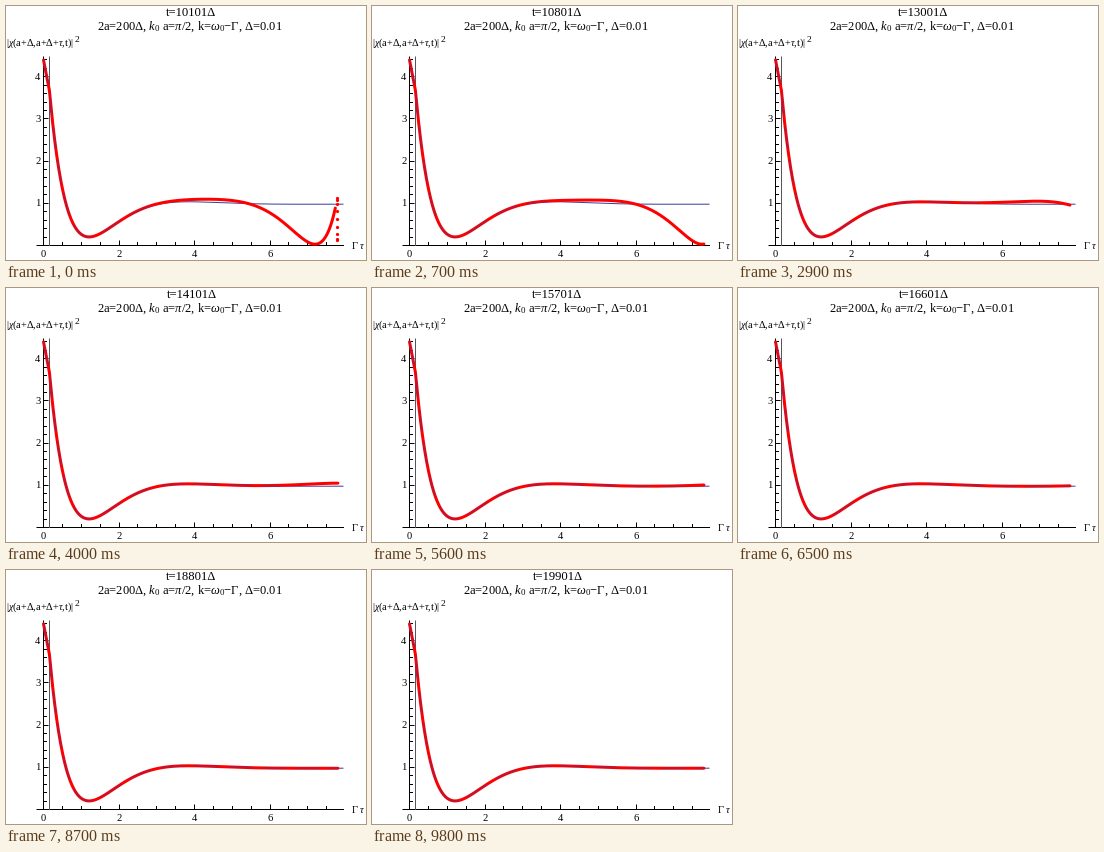
Recreate the animation shown at these times as a matplotlib script. Size 360x254 px, loop 9.9 s.

```python
import numpy as np
import matplotlib as mpl
import matplotlib.pyplot as plt
from matplotlib.animation import FuncAnimation

W, H, DPI = 360, 254, 100
FRAMES, INTERVAL = 99, 100
GAMMA = np.pi / 40
STEP = 0.01 * GAMMA          # one time step, in units of 1/Gamma
DELAY = 2 * GAMMA            # travel time between the two mirrors' ends
X0, Y0, SX, SY = 37.5, 239.5, 37.75, 42.2
RED, BLUE = "#ff0000", "#3f3d99"

mpl.rcParams.update({
    "font.family": "Liberation Serif",
    "mathtext.fontset": "custom",
    "mathtext.rm": "Liberation Serif",
    "mathtext.it": "Liberation Serif:italic",
})


def pt(px):
    return px * 72 / DPI


def to_px(x, y):
    return X0 + SX * np.asarray(x), Y0 - SY * np.asarray(y)


def interference(x, size, decay, freq, phase):
    """Intensity of a unit wave minus a decaying, rotating one."""
    m = size * np.exp(-decay * x)
    return 1 - 2 * m * np.sin(freq * x + phase) + m ** 2


def steady(x):
    def late(v):
        return 0.98 * interference(v, 2.18, 1.03, 1, 0.03)
    early = 4.4 + (late(DELAY) - 4.4) * x / DELAY
    return np.where(x < DELAY, early, late(x))


def build_up(s):
    """Relative size a time s after the wave front has passed."""
    return interference(s, 1.93, 1.07, 0.93, 0.75)


fig = plt.figure(figsize=(W / DPI, H / DPI), dpi=DPI, facecolor="white")
ax = fig.add_axes([0, 0, 1, 1])
ax.set_xlim(0, W)
ax.set_ylim(H, 0)
ax.axis("off")


def label(x, y, text, size, ha="center"):
    return ax.text(x, y, text, fontsize=pt(size), ha=ha, va="baseline")


def stroke(xs, ys, color="black", width=1, **kw):
    return ax.plot(xs, ys, color=color, lw=pt(width), snap=False, **kw)[0]


def centre(v):
    return np.floor(v) + 0.5


def tick_length(k, every):
    return 4.5 if k % every == 0 else 3


# axes and ticks
stroke([31, 337.5], [Y0, Y0], zorder=1)
stroke([X0, X0], [51, Y0], zorder=1)
for k in range(16):
    x = centre(X0 + SX * k / 2)
    stroke([x, x], [Y0, Y0 - tick_length(k, 4)], zorder=1)
for k in range(1, 23):
    y = centre(Y0 - SY * k / 5)
    stroke([X0, X0 + tick_length(k, 5)], [y, y], zorder=1)
for n in range(0, 8, 2):
    label(X0 + n * SX, 251, str(n), 10.5)
for n in range(1, 5):
    label(34.5, Y0 - n * SY + 3, str(n), 10.5, "right")

# captions
title = label(185.5, 10, "", 12.6)
label(184, 24, r"2a=200Δ, $k_0$ a=$\pi$/2, k=$\omega_0$−Γ, Δ=0.01", 12.5)
label(0, 40, r"|$\chi$(a+Δ,a+Δ+$\tau$,t)|", 10.3, "left")
label(69, 36, "2", 9.5, "left")
label(345, 243, r"Γ $\tau$", 10.5, "left")

# curves
stroke([43.5, 43.5], [51, Y0], "#55555f", zorder=2)
xs = np.linspace(0, 10101 * STEP, 900)
stroke(*to_px(xs, steady(xs)), BLUE, zorder=2)

tau = np.linspace(0, 7.8, 900)
base = steady(tau)
red = stroke([], [], RED, 3, zorder=3, solid_capstyle="round",
             solid_joinstyle="round")
overlap = stroke([], [], BLUE, 1.2, zorder=4, alpha=0.5, dashes=(20, 8))
front = stroke([], [], RED, 0, zorder=3, marker="o", ms=pt(3.2), mew=0)
front_values = 0.62 + 0.5 * np.cos(np.linspace(0, np.pi, 9))


def update(i):
    t = 10101 + 100 * i
    title.set_text(f"t={t}Δ")
    s = t * STEP - tau
    y = base * build_up(s)
    seen = s >= 0.2
    red.set_data(*to_px(tau[seen], y[seen]))
    settled = (s > 4) & (np.abs(y - base) < 0.02)
    overlap.set_data(*to_px(tau, np.where(settled, base, np.nan)))
    edge = t * STEP - DELAY
    dots = front_values if edge < tau[-1] else front_values[:0]
    front.set_data(*to_px(np.full(len(dots), edge), dots))
    return title, red, overlap, front


anim = FuncAnimation(fig, update, frames=FRAMES, interval=INTERVAL,
                     repeat=True, repeat_delay=0, blit=False)
plt.show()
```
